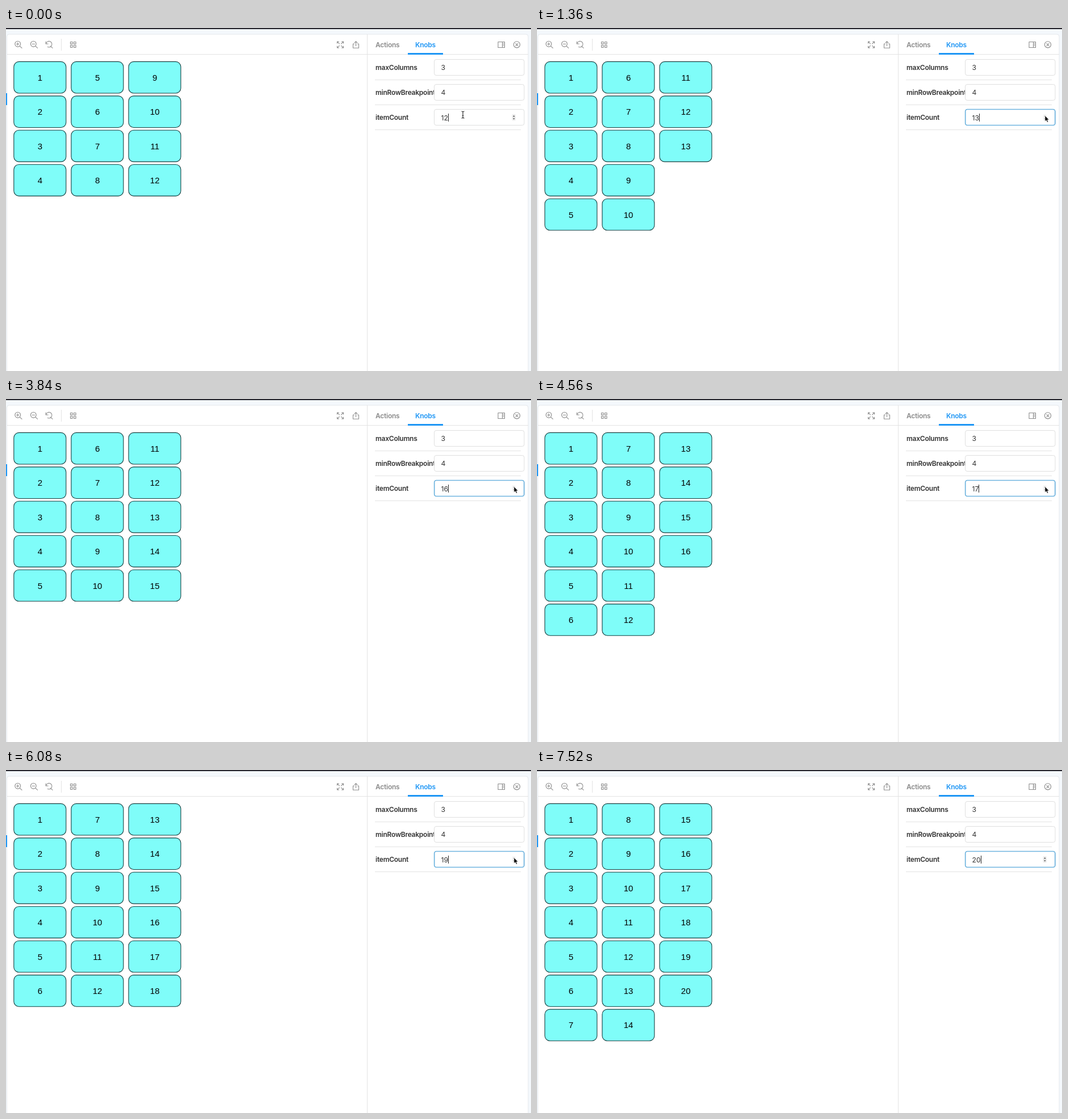
Write an HTML page that moves like this. It is 925 px wide and 605 px high and loops after 7.6 s.

```html
<!DOCTYPE html>
<html lang="en">
<head>
<meta charset="utf-8">
<title>Column grid knobs</title>
<style>
  html, body { margin: 0; width: 100%; height: 100%; overflow: hidden; background: #f6f9fc; }
  svg { display: block; width: 925px; height: 605px; }
  .ui { font: 400 12.2px Inter, Roboto, sans-serif; fill: #333; }
  .bold { font-weight: 600; font-size: 12px; letter-spacing: -.02em; }
  .cell rect { fill: #7ffdf9; stroke: #173f40; stroke-width: 1.1; }
  .cell text { font: 15px "Liberation Sans", Arial, sans-serif; text-anchor: middle; fill: #000; }
  .icons { fill: none; stroke: #8d8d8d; stroke-width: 1.1; stroke-linecap: round; stroke-linejoin: round; }
  .rule { stroke: #e3e3e3; fill: none; }
  .field { fill: #fff; stroke: #dfdfdf; }
</style>
</head>
<body>
<svg viewBox="0 0 925 605">
  <rect width="925" height="605" fill="#f4f8fc"/>
  <rect width="925" height="2" fill="#24242b"/>
  <path d="M1.5 606V15q0-4 4-4H916q4 0 4 4V606z" fill="#fff" stroke="#e4e8ec"/>
  <rect y="115" width="2" height="21" fill="#1e96f5"/>
  <path class="rule" d="M2 46.5H920M636.5 11V605M97.5 19V40"/>

  <g class="icons">
    <g id="lens"><circle cx="20.7" cy="28.2" r="4.9"/><path d="M24.3 31.8L28 35.3M18.4 28.2H23"/></g>
    <path d="M20.7 25.9V30.5"/>
    <use href="#lens" x="27.6"/>
    <path d="M70.2 24V28H74.2M70.6 27.6A5.2 5.2 0 1 1 73.4 33.2M78.6 32.2L82 35.3"/>
    <path d="M113.5 24.5h3.6v3.6h-3.6zM119.5 24.5h3.6v3.6h-3.6zM113.5 30.5h3.6v3.6h-3.6zM119.5 30.5h3.6v3.6h-3.6z"/>
    <path d="M583.5 27V24H586.5M591.5 24H594.5V27M594.5 32V35H591.5M586.5 35H583.5V32M583.8 24.3L587.4 27.9M594.2 24.3L590.6 27.9M594.2 34.7L590.6 31.1M583.8 34.7L587.4 31.1"/>
    <path d="M613.5 28H611.5V35.3H621.5V28H619.5M616.5 31.5V23.8M613.9 26.2L616.5 23.6L619.1 26.2"/>
    <path d="M867 24.5H878.5V34.5H867zM874.5 24.5V34.5M876 27h1M876 29h1M876 31h1"/>
    <circle cx="900" cy="29.3" r="5.6"/><path d="M898 27.3L902 31.3M902 27.3L898 31.3"/>
  </g>

  <g class="ui bold">
    <text x="651" y="34" fill="#8a8a8a">Actions</text>
    <text x="721" y="34" fill="#1e96f5">Knobs</text>
    <text x="651" y="74">maxColumns</text>
    <text x="651" y="118">minRowBreakpoint</text>
    <text x="651" y="162">itemCount</text>
  </g>
  <rect x="708" y="44" width="62" height="3" fill="#1e96f5"/>
  <path class="rule" d="M650 91.5H907M650 135.5H907M650 179.5H907"/>

  <g class="ui">
    <rect class="field" x="754.5" y="55.5" width="158.5" height="28" rx="3.5"/>
    <rect class="field" x="754.5" y="99.5" width="158.5" height="28" rx="3.5"/>
    <rect class="field" x="754.5" y="143.5" width="158.5" height="28" rx="3.5"/>
    <rect id="focus" x="754.7" y="143.5" width="158.1" height="28" rx="3.5" fill="none" stroke="#6fb4df" stroke-width="1.7"/>
    <text x="766.5" y="74">3</text>
    <text x="766.5" y="118">4</text>
    <text id="value" x="766.5" y="162.5"></text>
  </g>
  <rect id="caret" y="151" width="1" height="14" fill="#222"/>
  <g id="spin">
    <rect x="891.5" y="152" width="6.5" height="11.5" rx="2" fill="#ececec"/>
    <path d="M893 156.4l1.8-2.4 1.8 2.4zM893 159.2l1.8 2.4 1.8-2.4z" fill="#555"/>
  </g>

  <g id="grid"></g>

  <path id="beam" d="M-2.5-6Q0-6 0-4.5Q0-6 2.5-6M0-4.5V4.5M-2.5 6Q0 6 0 4.5Q0 6 2.5 6M-1.2 1.5H1.2" fill="none" stroke="#222" stroke-width="1.1"/>
  <path id="arrow" d="M0 0V10.2L2.3 8.1L3.9 11.8L5.7 11L4.1 7.4H7.2z" fill="#000" stroke="#fff" stroke-width=".7"/>
</svg>
<script>
const LOOP = 7600, BLINK = 480, COLS = 3, MIN_ROWS = 4, MAX = 20;

// [time, value] for the field, then for the grid that follows it
const typed = [[0, 12], [960, 13], [2080, 14], [2880, 15], [3680, 16], [4480, 17], [5120, 18], [5840, 19], [6560, 20]];
const shown = [[0, 12], [1360, 13], [2400, 14], [3200, 15], [4000, 16], [4800, 17], [5440, 18], [6240, 19], [6800, 20]];
const HIDE = 7360;

const $ = id => document.getElementById(id);
const show = (el, on) => el.style.visibility = on ? "visible" : "hidden";
const place = (el, x, y) => el.setAttribute("transform", `translate(${x} ${y})`);
const at = (steps, t) => steps.findLast(s => s[0] <= t);
const ramp = (t, a, b) => Math.min(1, Math.max(0, (t - a) / (b - a)));
const ease = k => k * k * (3 - 2 * k);

const make = (name, parent, attrs = {}) => {
  const el = document.createElementNS("http://www.w3.org/2000/svg", name);
  for (const key in attrs) el.setAttribute(key, attrs[key]);
  return parent.appendChild(el);
};

const cells = Array.from({ length: MAX }, (_, i) => {
  const g = make("g", $("grid"), { class: "cell" });
  make("rect", g, { width: 92, height: 55.6, rx: 9 });
  make("text", g, { x: 46.2, y: 33.4 }).textContent = i + 1;
  return g;
});

function layout(count) {
  const rows = Math.max(MIN_ROWS, Math.ceil(count / COLS));
  cells.forEach((cell, i) => {
    show(cell, i < count);
    place(cell, 13.8 + 101.1 * Math.floor(i / rows), 59.4 + 60.45 * (i % rows));
  });
}

function drawField(t) {
  const [since, value] = at(typed, t);
  const text = $("value");
  text.textContent = value;
  $("caret").setAttribute("x", Math.round(766.5 + text.getComputedTextLength()));
  show($("caret"), Math.floor((t - since) / BLINK) % 2 === 0);
  $("focus").style.opacity = ramp(t, 0, 240);
}

function drawMouse(t) {
  const k = ease(ramp(t, 80, 800));
  const x = 805 + 90 * k, y = 153 + 1.5 * k;
  const overSpin = x > 889, visible = t < HIDE;
  show($("beam"), !overSpin);
  show($("arrow"), overSpin && visible);
  place($("beam"), x, y);
  place($("arrow"), x, y);
  $("spin").style.opacity = overSpin && visible ? .45 : 1;
}

function frame() {
  const t = performance.now() % LOOP;
  layout(at(shown, t)[1]);
  drawField(t);
  drawMouse(t);
  requestAnimationFrame(frame);
}
frame();
</script>
</body>
</html>
```
